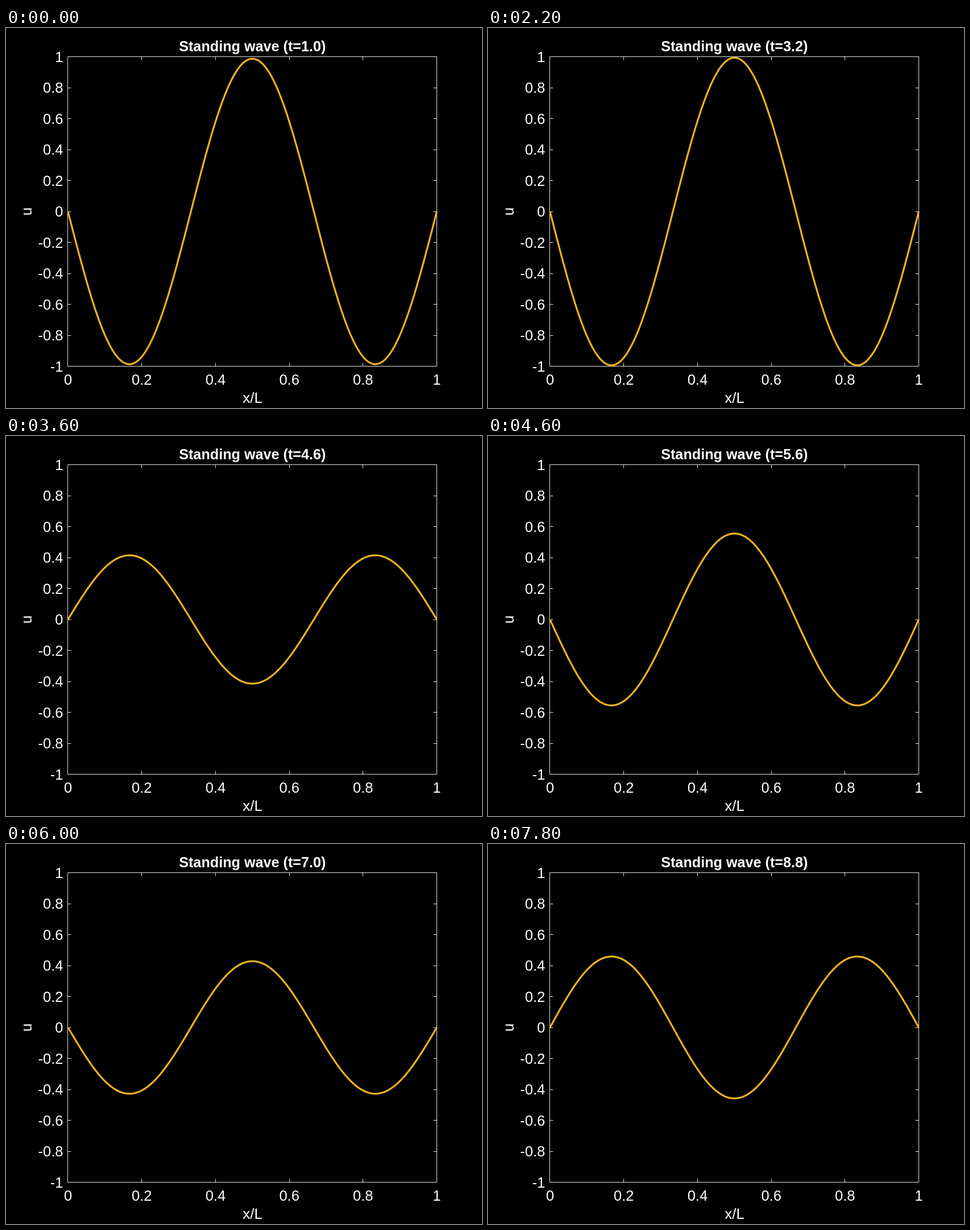
These frames come from a looping animation (837x669 px, 8 s). An HTML page with a canvas:

```html
<!DOCTYPE html>
<html lang="en">
<head>
<meta charset="utf-8">
<title>Standing wave</title>
<style>
  html, body { margin: 0; width: 100%; height: 100%; overflow: hidden; background: #000; }
  canvas { display: block; }
</style>
</head>
<body>
<canvas id="stage" width="837" height="669"></canvas>
<script>
const ctx = document.getElementById('stage').getContext('2d');
const FONT = '"Liberation Sans", Arial, sans-serif';
const LEFT = 109, RIGHT = 757.5, TOP = 50.5, BOTTOM = 595.5;
const TICK = 6, STEP = 200, STEPS = 40;
const OMEGA = 3 * Math.PI * Math.sqrt(0.1);

const px = x => LEFT + x * (RIGHT - LEFT);
const py = u => (TOP + BOTTOM) / 2 - u * (BOTTOM - TOP) / 2;
const snap = v => Math.floor(v) + 0.5;
const label = v => String(Math.round(v * 10) / 10);

function text(str, x, y, size, align = 'center', weight = 'normal') {
  ctx.font = `${weight} ${size}px ${FONT}`;
  ctx.textAlign = align;
  ctx.fillText(str, x, y);
}

function line(x1, y1, x2, y2) {
  ctx.moveTo(x1, y1);
  ctx.lineTo(x2, y2);
}

function drawAxes() {
  const l = snap(LEFT - 0.5), r = snap(RIGHT);
  ctx.strokeStyle = '#e6e6e6';
  ctx.lineWidth = 1;
  ctx.beginPath();
  ctx.rect(l, TOP, r - l, BOTTOM - TOP);
  for (let i = 1; i < 5; i++) {
    const x = snap(px(i / 5));
    line(x, TOP, x, TOP + TICK);
    line(x, BOTTOM, x, BOTTOM - TICK);
  }
  for (let i = -4; i < 5; i++) {
    const y = snap(py(i / 5));
    line(l, y, l + TICK, y);
    line(r, y, r - TICK, y);
  }
  ctx.stroke();
}

function drawLabels(t) {
  ctx.fillStyle = '#fff';
  for (let i = 0; i <= 5; i++) text(label(i / 5), px(i / 5), 628, 25.5);
  for (let i = -5; i <= 5; i++) text(label(i / 5), 100.5, py(i / 5) + 9, 25.5, 'right');
  text(`Standing wave (t=${t.toFixed(1)})`, 433.3, 41, 25.2, 'center', 'bold');
  text('x/L', 433.5, 660, 26);
  ctx.save();
  ctx.translate(45, 323);
  ctx.rotate(-Math.PI / 2);
  text('u', 0, 0, 26);
  ctx.restore();
}

function drawWave(t) {
  const amp = Math.cos(OMEGA * t);
  ctx.strokeStyle = '#f0b220';
  ctx.lineWidth = 3.2;
  ctx.lineJoin = 'round';
  ctx.beginPath();
  for (let i = 0; i <= 200; i++) {
    const x = i / 200;
    ctx.lineTo(px(x), py(amp * Math.sin(3 * Math.PI * x)));
  }
  ctx.stroke();
}

function frame() {
  const step = Math.floor(performance.now() / STEP) % STEPS;
  const t = 1 + step / 5;
  ctx.fillStyle = '#000';
  ctx.fillRect(0, 0, 837, 669);
  drawAxes();
  drawLabels(t);
  drawWave(t);
  requestAnimationFrame(frame);
}
frame();
</script>
</body>
</html>
```
